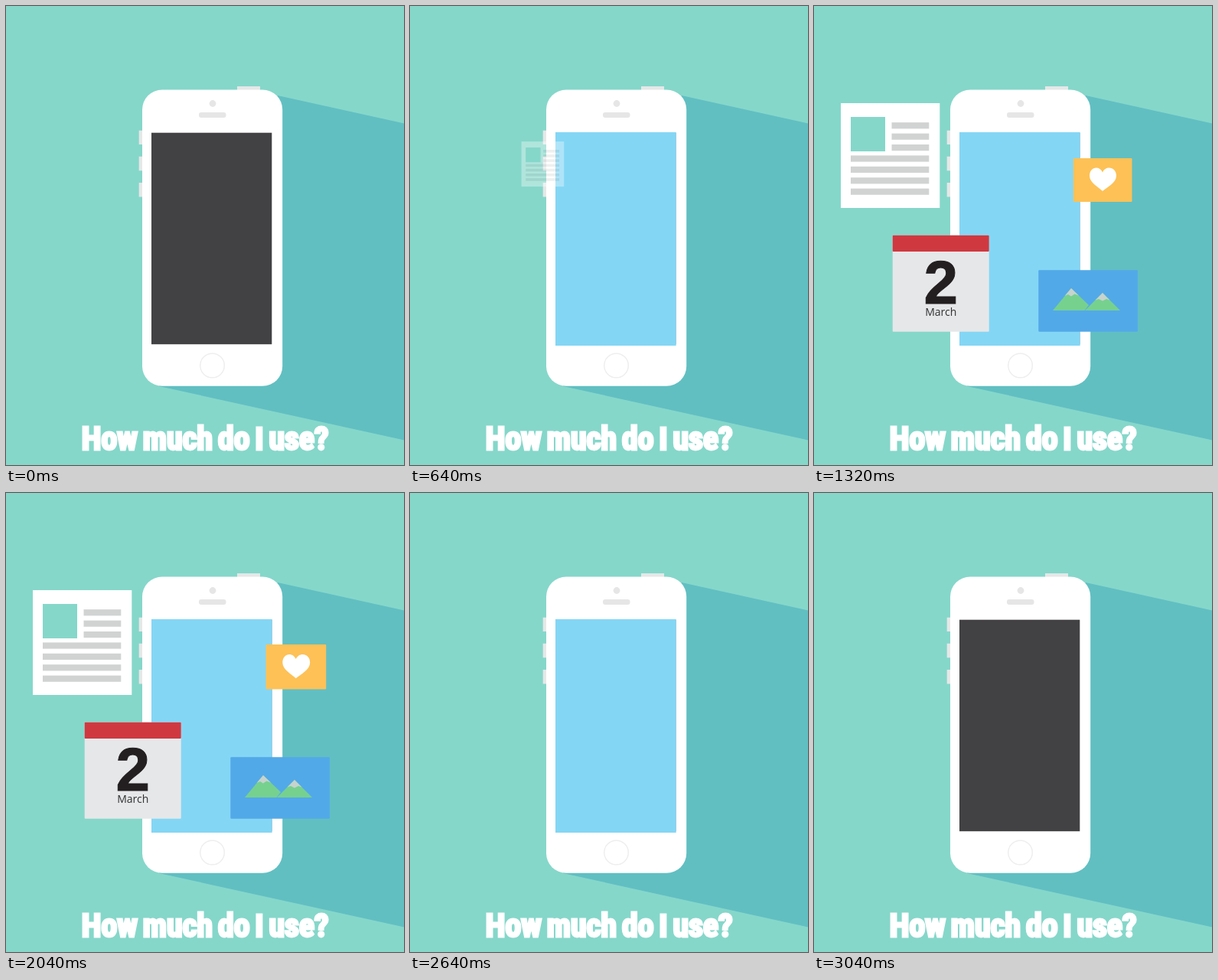
These frames come from a looping animation (520 px wide and 600 px high, 3400 ms). An HTML page:

```html
<!DOCTYPE html>
<html lang="en">
<head>
<meta charset="utf-8">
<title>How much do I use?</title>
<style>
  html, body { margin: 0; width: 100%; height: 100%; overflow: hidden; background: #85d7ca; }
  svg { display: block; width: 520px; height: 600px; }
  text { text-anchor: middle; }
  #caption {
    font: 900 45px "Impact", "Roboto Condensed", "Roboto", sans-serif;
    font-stretch: 75%; letter-spacing: -.01em; word-spacing: -.06em;
    fill: #fff; stroke: #fff; stroke-width: 2.8;
  }
  /* a capital I without serifs */
  #caption tspan { font-family: "Liberation Sans", Arial, sans-serif; }
</style>
</head>
<body>
<svg viewBox="0 0 520 600">
  <rect width="520" height="600" fill="#85d7ca"/>
  <path d="M355 117L520 153.5V567.5L200 497Z" fill="#61bfc2"/>

  <path d="M302 105h30v8h-30zM173.7 162.8h8v18.2h-8zM173.7 196.8h8v18.4h-8zM173.7 231h8v18.4h-8z" fill="#e6e7e8"/>
  <rect x="178" y="109.5" width="183.2" height="387.3" rx="26" fill="#fff"/>
  <circle cx="270" cy="127.5" r="4.4" fill="#e6e6e6"/>
  <rect x="252" y="139" width="35.5" height="7" rx="3" fill="#e6e6e6"/>
  <circle cx="269.5" cy="470" r="15.8" fill="#fff" stroke="#eee" stroke-width="1.5"/>
  <rect x="190" y="165.7" width="157.3" height="276.5" fill="#424143"/>
  <rect id="glow" x="190" y="165" width="157.6" height="279" fill="#84d6f5"/>

  <g id="paper">
    <rect x="35" y="127" width="129.3" height="137" fill="#fff"/>
    <rect x="48" y="145" width="45" height="45" fill="#85d7ca"/>
    <g id="lines" fill="#d1d3d3"></g>
  </g>

  <g id="calendar">
    <rect x="102.7" y="299.8" width="126" height="126" rx="1" fill="#e6e7e9"/>
    <rect x="102.7" y="299.8" width="126" height="21.2" rx="1" fill="#d03840"/>
    <text x="165.7" y="388.5" font-family="Liberation Sans, Arial, sans-serif" font-weight="700"
      font-size="80" fill="#231f20" stroke="#231f20">2</text>
    <text x="165.7" y="405" font-family="Open Sans, Noto Sans, sans-serif" font-size="14" fill="#333">March</text>
  </g>

  <g id="photo">
    <rect x="293.3" y="345.3" width="129.6" height="80.4" rx="1" fill="#52a9e8"/>
    <path d="M354 398L377 375L400 398Z" fill="#76d18f"/>
    <path d="M377 375L367.5 384.5L372 383L377 385.5L382 383L386.5 384.5Z" fill="#c6d3ce"/>
    <path d="M312 398L336 369L359 391L353.5 398Z" fill="#76d18f"/>
    <path d="M336 369L327.5 379L332 377L336 379.5L340.5 376.5L346 378.5Z" fill="#c6d3ce"/>
  </g>

  <g id="heart">
    <rect x="338.8" y="199" width="76.7" height="57" rx="1" fill="#fdc156"/>
    <path d="M377 242C372 237 360 231 360 222C360 210 373 208 377 217.5C381 208 395 210 395 222C395 231 383 237 377 242Z" fill="#fff"/>
  </g>

  <text id="caption" x="260" y="580.4">How much do <tspan>I</tspan> use?</text>
</svg>
<script>
const STEP = 40, LOOP = 3400;
const el = id => document.getElementById(id);
const clamp = v => Math.max(0, Math.min(1, v));

// Seven text lines in the newspaper; the first three sit beside its picture.
el('lines').innerHTML = Array.from({ length: 7 }, (_, i) => {
  const x = i < 3 ? 101.5 : 48;
  return `<rect x="${x}" y="${152.2 + 14.4 * i}" width="${150.3 - x}" height="8.2"/>`;
}).join('');

// Fit the caption by font size, whichever heavy face is available.
const caption = el('caption');
caption.style.fontSize = 45 * 323 / caption.getComputedTextLength() + 'px';

// Cards pop out of the phone from "home" to "at"; "grow" and "shrink" give the scale per step.
const POP = [.43, 1.05, 1], DROP = [1.026, .5, 0];
const cards = [
  { id: 'paper', at: [99.6, 195.5], home: [229, 215], start: 640, grow: POP, end: 2520, shrink: [1.026, .56, .3, 0] },
  { id: 'calendar', at: [165.7, 362.8], home: [235, 345], start: 840, grow: POP, end: 2360, shrink: DROP },
  { id: 'photo', at: [358, 385.5], home: [300, 365], start: 1000, grow: POP, end: 2200, shrink: DROP },
  { id: 'heart', at: [377, 227.5], home: [310, 235], start: 1200, grow: [.3, .75, 1.05, 1], end: 2040, shrink: DROP }
];

const pose = (list, ms) => list[Math.min(list.length - 1, Math.floor(ms / STEP))];

function scaleAt(card, t) {
  if (t < card.start) return 0;
  return t < card.end ? pose(card.grow, t - card.start) : pose(card.shrink, t - card.end);
}

function place(card, t) {
  const s = scaleAt(card, t), g = el(card.id);
  const [x, y] = card.at.map((a, i) => card.home[i] + (a - card.home[i]) * s);
  g.setAttribute('transform', `translate(${x} ${y}) scale(${s}) translate(${-card.at[0]} ${-card.at[1]})`);
  g.setAttribute('opacity', clamp((s - .12) / .88));
}

function draw(now) {
  const t = Math.floor(now % LOOP / STEP) * STEP;
  el('glow').setAttribute('opacity', clamp(Math.min(t, 3040 - t) / 280));
  cards.forEach(card => place(card, t));
}

let begin;
function tick(now) {
  begin ??= now;
  draw(now - begin);
  requestAnimationFrame(tick);
}
draw(0);
requestAnimationFrame(tick);
</script>
</body>
</html>
```
